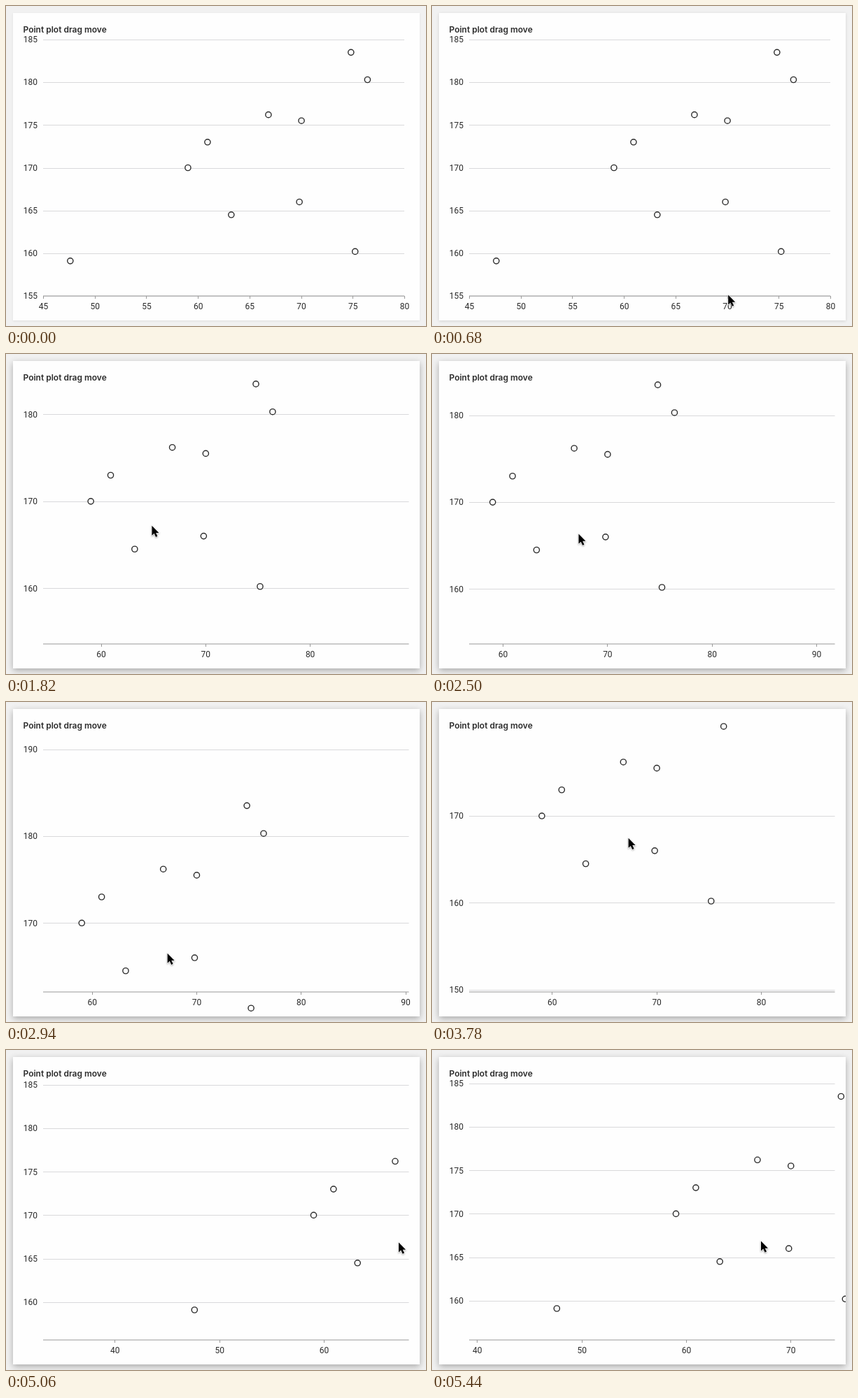
These frames come from a looping animation (600x458 px, 5.5 s). An HTML page:

```html
<!DOCTYPE html>
<html lang="en">
<head>
<meta charset="utf-8">
<title>Point plot drag move</title>
<style>
html, body { margin: 0; width: 100%; height: 100%; overflow: hidden; background: #f1f1f1; }
#card { position: absolute; left: 10px; top: 10px; width: 581px; height: 440px; background: #fefefe; }
svg { position: absolute; left: 0; top: 0; }
text { font: 400 12px Roboto, sans-serif; fill: #2b2b2b; }
.title { font: 600 12px Inter, sans-serif; }
.grid { fill: #d9d9db; }
.axis { fill: #999; }
.point { fill: #fefefe; stroke: #2b2b2b; stroke-width: 1.4; }
#cursor { fill: #000; stroke: #fff; stroke-width: 1.2; paint-order: stroke; filter: drop-shadow(0 1px 1px rgba(0, 0, 0, .35)); }
</style>
</head>
<body>
<div id="card"></div>
<svg width="600" height="458" viewBox="0 0 600 458">
  <clipPath id="inside"><rect x="10" y="10" width="581" height="440"/></clipPath>
  <g clip-path="url(#inside)">
    <g id="plot"></g>
    <text class="title" x="24.5" y="38">Point plot drag move</text>
  </g>
  <path id="cursor" d="M0 0V14L3.2 11.1L5.6 16.2L8 15.1L5.7 10.3H10Z"/>
</svg>
<script>
const LOOP = 5500, LAG = 40;
const ENTER = 540, PRESS = 1660;
const LEFT = 53.5, BOTTOM = 415;
const entry = { x: 440, y: 458 }, grab = { x: 384, y: 268 };

const points = [
  [47.6, 159.1], [59, 170], [60.9, 173], [63.2, 164.5], [66.8, 176.2],
  [69.8, 166], [70, 175.5], [74.8, 183.5], [75.2, 160.2], [76.4, 180.3]
];

// Pointer strokes: start, end, then the place reached.
const strokes = [
  [ENTER, 1000, 365, 262],
  [1100, 1560, grab.x, grab.y],
  [PRESS, 1830, 207, 246],
  [2380, 2985, 231, 362],
  [3340, 3805, 281, 194],
  [3805, 3940, 299, 213],
  [4180, 4320, 394, 213],
  [4320, 4376, 561, 276],
  [5200, 5400, 470, 274]
];

function ease(t, from, to) {
  const u = Math.min(1, Math.max(0, (t - from) / (to - from)));
  return u * u * (3 - 2 * u);
}

function pointerAt(t) {
  let { x, y } = entry;
  for (const [from, to, toX, toY] of strokes) {
    const part = ease(t, from, to);
    x += (toX - x) * part;
    y += (toY - y) * part;
  }
  return { x, y };
}

// The plot trails slightly behind the pointer that drags it.
function panAt(t) {
  if (t < PRESS) return { x: 0, y: 0 };
  const p = pointerAt(t - LAG);
  return { x: p.x - grab.x, y: p.y - grab.y };
}

function ticks(low, high, step) {
  const list = [];
  for (let v = Math.ceil(low / step) * step; v <= high; v += step) list.push(v);
  return list;
}

const bar = (cls, x, y, w, h) =>
  `<rect class="${cls}" x="${x}" y="${y}" width="${w}" height="${h}"/>`;
const label = (x, y, anchor, value) =>
  `<text x="${x}" y="${y}" text-anchor="${anchor}">${value}</text>`;

function plotMarkup(t) {
  const dragged = t >= PRESS, pan = panAt(t);
  const right = dragged ? 576 : 569.5, top = dragged ? 41.8 : 48;
  const kx = (right - LEFT) / 35, ky = (BOTTOM - top) / 30;
  const lowX = 45 - pan.x / kx, lowY = 155 + pan.y / ky;
  const toX = v => LEFT + (v - lowX) * kx;
  const toY = v => BOTTOM - (v - lowY) * ky;
  const stepX = dragged ? 10 : 5;
  const stepY = lowY >= 155 && lowY < 156 ? 5 : 10;
  const width = right - LEFT;

  let out = '';
  for (const v of ticks(lowY, lowY + 30, stepY)) {
    const y = toY(v);
    out += bar('grid', LEFT - .5, Math.round(y), width, 1) + label(45, y + 4.3, 'end', v);
  }
  out += bar('axis', LEFT - .5, BOTTOM - .5, width, 1);
  for (const v of ticks(lowX, lowX + 35, stepX)) {
    const x = toX(v);
    out += bar('axis', Math.floor(x), BOTTOM, 1, 4) + label(x, 434, 'middle', v);
  }
  for (const [x, y] of points) {
    out += `<circle class="point" cx="${toX(x)}" cy="${toY(y)}" r="4.1"/>`;
  }
  return out;
}

const card = document.getElementById('card');
const plot = document.getElementById('plot');
const cursor = document.getElementById('cursor');
const start = performance.now();

function draw() {
  const t = Math.max(0, performance.now() - start) % LOOP;
  const p = pointerAt(t), depth = ease(t, ENTER, 1000);
  plot.innerHTML = plotMarkup(t);
  cursor.style.display = t < ENTER ? 'none' : '';
  cursor.setAttribute('transform', `translate(${p.x} ${p.y - .5})`);
  card.style.boxShadow = `0 ${1 + 2 * depth}px ${3 + 6 * depth}px rgba(0, 0, 0, ${.08 + .22 * depth})`;
  requestAnimationFrame(draw);
}
draw();
</script>
</body>
</html>
```
